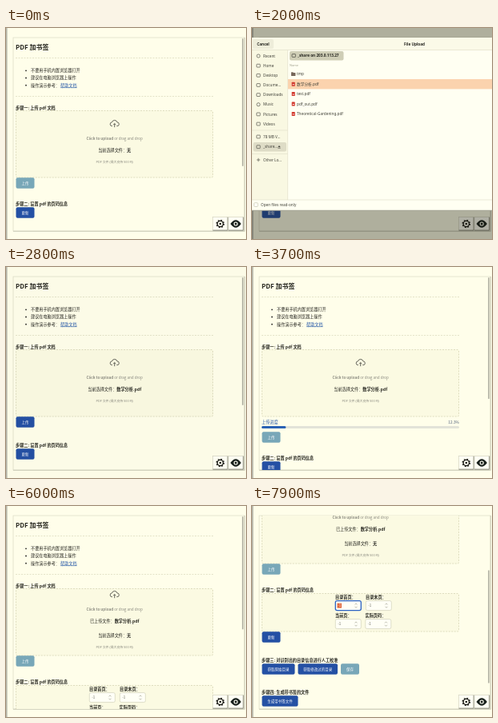
An HTML page that plays this animation: 300 px wide and 264 px high, repeating every 8000 ms.

```html
<!DOCTYPE html>
<html lang="zh">
<head>
<meta charset="utf-8">
<style>
html, body { margin: 0; width: 100%; height: 100%; overflow: hidden; background: #fffeea; }
svg { display: block; width: 100vw; height: 100vh; }
text { font-family: "Noto Sans CJK SC", "Noto Sans CJK", "Noto Sans", sans-serif; white-space: pre; }
.ui text { font-family: "Noto Sans", "Open Sans", "Noto Sans CJK SC", sans-serif; }
</style>
</head>
<body>
<svg id="stage" viewBox="0 0 300 264"></svg>
<script>
const LOOP = 8000;
const PAGE = '#fffeea', INK = '#25251f', GREY = '#8b8b80', BLUE = '#2450a4', PALE = '#78a7b8';
const TOP = 12, VIEW = 242;
const stage = document.getElementById('stage');

const clamp = v => Math.max(0, Math.min(1, v));
const ramp = (t, from, to) => clamp((t - from) / (to - from));
const easeOut = p => 1 - (1 - p) ** 2;

const rect = (x, y, w, h, fill, more = '') =>
  `<rect x="${x}" y="${y}" width="${w}" height="${h}" fill="${fill}" ${more}/>`;
const path = (d, stroke, width = 0.7, more = '') =>
  `<path d="${d}" fill="none" stroke="${stroke}" stroke-width="${width}" ${more}/>`;
// y is the middle of the line
const text = (x, y, s, size = 5.15, fill = INK, more = '') =>
  `<text x="${x}" y="${y + size * 0.36}" font-size="${size}" fill="${fill}" ${more}>${s}</text>`;
const BOLD = 'font-weight="700"', MID = 'text-anchor="middle"';
const bold = s => `<tspan ${BOLD}>${s}</tspan>`;
const heading = (y, s) => text(12, y, s, 5.15, INK, BOLD);
const button = (x, y, w, s, on = true) =>
  rect(x, y - 6.8, w, 13.6, on ? BLUE : PALE, 'rx="2"') +
  text(x + w / 2, y, s, 4.5, '#fff', MID);
const dashed = (y, h) =>
  rect(12.5, y, 246, h, '#fbfae2', 'rx="1.5" stroke="#d6d5b4" stroke-width=".8" stroke-dasharray="2 1.5"');
const rule = y => path(`M12 ${y}H259`, '#d9d8ba', 0.7, 'stroke-dasharray="2 1.5"');

function scrollAt(t) {
  const gesture = [25, 62, 86, 100, 100, 109, 115];
  const i = Math.floor((t - 6500) / 100);
  return i < 0 ? 0 : gesture[Math.min(i, gesture.length - 1)];
}

function progressAt(t) {
  const p = (Math.floor(t / 100) * 100 - 3500) / 500;
  return p <= 0.4 ? clamp(p) * 30.75 : 12.3 + clamp((p - 0.4) / 0.6) * 87.7;
}

function cloud(y) {
  return path(`M133 ${y + 2.7}h-.3a2.4 2.4 0 0 1-.2-4.8a3.3 3.3 0 0 1 6.4 0a2.4 2.4 0 0 1 0 4.8h-.6` +
    `M135.7 ${y + 4.2}v-4.6m-1.6 1.6l1.6-1.6l1.6 1.6`, '#55554d', 0.9);
}

function dropZone(t) {
  const done = t >= 4700, up = done ? 9 : 0;
  const chosen = t >= 2300 && !done ? '数学分析.pdf' : '无';
  return dashed(103.5, 83.5) + cloud(120 - up) +
    text(135.7, 138 - up, bold('Click to upload') + ' or drag and drop', 4.6, GREY, MID) +
    (done ? text(135.7, 144, '已上传文件：' + bold('数学分析.pdf'), 5.15, INK, MID) : '') +
    text(135.7, done ? 162 : 153, '当前选择文件：' + bold(chosen), 5.15, INK, MID) +
    text(135.7, done ? 177 : 168, 'PDF 文件 (最大支持 500 M)', 3.9, GREY, MID);
}

function progressBar(t) {
  const pct = progressAt(t);
  return text(12, 194, '上传进度', 5.15, '#2b5ca8') +
    text(259, 194, pct.toFixed(1) + '%', 4.8, '#52627c', 'text-anchor="end"') +
    rect(12, 199, 247, 3, '#e2e3d8', 'rx="1.5"') +
    rect(12, 199, 247 * pct / 100, 3, '#2b62b4', 'rx="1.5"');
}

function field(x, y, label, focus) {
  const edge = focus ? 'stroke="#2b62c4" stroke-width="1.3"' : 'stroke="#c9c9b2" stroke-width=".6"';
  return text(x, y, label, 5.15, INK, BOLD) +
    rect(x + .3, y + 4.6, 32, 12, '#fffff6', `rx="2" ${edge}`) +
    (focus ? rect(x + 2.5, y + 7.6, 5.5, 6, '#e0663a') : '') +
    text(x + 3.2, y + 10.6, '-1', 4.4, focus ? '#fff' : '#66665c') +
    path(`M${x + 24.5} ${y + 9.4}l1.5-1.5l1.5 1.5m0 2.4l-1.5 1.5l-1.5-1.5`, '#8f8f80', 0.6);
}

function content(t) {
  const uploading = t >= 3500 && t < 4300, form = t >= 4700;
  const shift = uploading ? 19 : t >= 2300 && t < 3500 ? 3 : 0;
  const uploadOn = t >= 2300 && t < 3200;
  const low = shift + (form ? 48 : 0);
  const list = ['不要用手机内置浏览器打开', '建议在电脑浏览器上操作', '操作演示参考：'];
  return text(12, 24, 'PDF 加书签', 8, INK, BOLD) + rule(37.5) + rule(85.5) +
    list.map((s, i) => {
      const y = 53.3 + i * 9.2;
      return `<circle cx="25" cy="${y}" r=".9" fill="${INK}"/>` + text(31, y, s);
    }).join('') +
    text(68, 71.7, '帮助文档', 5.15, '#2b5ca8', 'text-decoration="underline"') +
    heading(100, '步骤一: 上传 pdf 文档') + dropZone(t) +
    (uploading ? progressBar(t) : '') +
    button(12.5, uploading ? 213 : 194, 23, '上传', uploadOn) +
    heading(220 + shift, '步骤二: 设置 pdf 的页码信息') +
    (form ? dashed(224.5, 47.5) +
      field(104, 229, '目录首页：', t >= 7300) + field(142, 229, '目录末页：') +
      field(104, 252, '当前页：') + field(141.5, 252, '实际页码：') : '') +
    button(12.5, 231 + low, 23, '更新') +
    heading(260 + low, '步骤三: 对识别出的目录信息进行人工校准') +
    button(12.5, 271 + low, 41, '获取原始目录') +
    button(57.5, 271 + low, 49.5, '获取修改过的目录') +
    button(111, 271 + low, 23, '保存', false) +
    heading(300 + low, '步骤四: 生成带书签的文件') +
    button(12.5, 311 + low, 45, '生成带书签文件');
}

function scrollbar(t, scroll) {
  const full = 366 + (t >= 3500 && t < 4300 ? 19 : t >= 4700 ? 48 : 0);
  return rect(295, TOP + 1 + scroll * VIEW / full, 1.8, VIEW * VIEW / full, '#b9b9aa', 'rx=".9"');
}

function tools() {
  const box = x => rect(x, 236.5, 18.5, 16.5, '#fffff4', 'stroke="#d5d5c2" stroke-width=".7"') +
    path(`M${x} 253.2h18.7v-16.5`, '#77776c', 0.8);
  const teeth = `<circle cx="267.8" cy="245" r="4.3" fill="none" stroke="#1c1c18" stroke-width="2" stroke-dasharray="1.7 1.68"/>`;
  return box(258.5) + box(278) + teeth +
    `<circle cx="267.8" cy="245" r="3.6" fill="#fffff4" stroke="#1c1c18" stroke-width="1.3"/>
     <circle cx="267.8" cy="245" r="1.3" fill="#1c1c18"/>
     <path d="M280.5 245q6.7-9.4 13.4 0q-6.7 9.4-13.4 0" fill="#18201c"/>
     <circle cx="287.2" cy="245" r="2.6" fill="#fffff4"/><circle cx="287.2" cy="245" r="1.5" fill="#18201c"/>`;
}

function page(t) {
  const scroll = scrollAt(t);
  return rect(0, 0, 300, 264, PAGE) + rect(0, 0, 1.6, 264, '#b5b5aa') +
    rect(9, TOP, 289, VIEW, PAGE, 'stroke="#dedec8" stroke-width=".8"') +
    path('M9 254.3H298.3V12', '#c4c4b2', 0.8) +
    `<g clip-path="url(#view)"><g transform="translate(0 ${-scroll})">${content(t)}</g></g>` +
    scrollbar(t, scroll) + tools();
}

const sideIcon = (y, round) => round
  ? `<circle cx="8" cy="${y}" r="2.1" fill="none" stroke="#55554d" stroke-width=".7"/>`
  : rect(5.8, y - 1.9, 4.4, 3.8, 'none', 'rx=".5" stroke="#55554d" stroke-width=".7"');

function dialog(t) {
  const places = ['Recent', 'Home', 'Desktop', 'Docume…', 'Downloads', 'Music', 'Pictures', 'Videos'];
  const files = ['tmp', '数学分析.pdf', 'test.pdf', 'pdf_out.pdf', 'Theoretical-Gardening.pdf'];
  const picked = t < 1600 ? 0 : 1;
  const small = (x, y, s, fill = '#44443c', more = '') => text(x, y, s, 4.7, fill, more);
  return rect(0, 12, 300, 216.5, '#fffff2') + rect(0, 12, 300, 15.5, '#fbfae8') +
    rect(1, 14, 26, 12, '#eeedda', 'rx="2"') +
    small(14, 20, 'Cancel', INK, MID + ' font-weight="600"') +
    small(203, 20, 'File Upload', INK, MID + ' ' + BOLD) +
    rect(0, 27.5, 44.5, 187.5, '#f9f8e2') +
    places.map((s, i) => sideIcon(35 + i * 12.15, i % 5 === 0) + small(14, 35 + i * 12.15, s)).join('') +
    path('M0 128H44.5', '#dddcc6', 0.6) +
    sideIcon(136) + small(14, 136, '78 MB V…') +
    rect(1.5, 143, 41.5, 11.5, '#dedcc6', 'rx="2"') + sideIcon(148.7) + small(14, 148.7, '_share…') +
    `<path d="M32.4 149l1.6-2l1.6 2zM32.4 149.7h3.2v.8h-3.2z" fill="#44443c"/>` +
    path('M0 157.5H44.5', '#dddcc6', 0.6) +
    path('M5.8 165h4.4M8 162.8v4.4', '#55554d') + small(14, 165, 'Other Lo…') +
    path('M44.6 27.5V215M0 215H300M0 27.5H300', '#dddcc6', 0.6) +
    rect(47, 29, 67.5, 11.5, '#cfceb6', 'rx="2"') +
    rect(50, 32.6, 4.4, 3.8, 'none', 'rx=".5" stroke="#44443c" stroke-width=".7"') +
    small(57, 34.7, '_share on 203.0.113.27', INK, 'font-weight="600"') +
    text(47, 46.3, 'Name', 3.9, '#a5a594') +
    rect(45, 51.6 + picked * 12.4, 255, 12.4, '#fbd3ae') +
    files.map((s, i) => {
      const y = 57.8 + i * 12.4;
      const icon = i ? rect(49.7, y - 2.5, 4, 5, '#d2372c', 'rx=".5"') + rect(50.8, y, 1.8, 1, '#fff')
        : rect(49, y - 1.8, 5.4, 4, '#77675a', 'rx=".5"') + rect(49, y - 2.5, 2.6, 1.5, '#77675a');
      return icon + small(56, y, s);
    }).join('') +
    rect(2.5, 218.7, 4.8, 4.8, '#fffff6', 'rx="1" stroke="#bdbda9" stroke-width=".6"') +
    small(11, 221, 'Open files read-only') + path('M0 228.3H300', '#8e8e80', 0.8);
}

function draw(t) {
  const dim = 0.34 * (easeOut(ramp(t, 400, 800)) - easeOut(ramp(t, 2200, 2950)));
  const shown = t < 2200 ? ramp(t, 400, 700) : 1 - ramp(t, 2200, 2400);
  stage.innerHTML = `<defs><clipPath id="view">${rect(9, TOP, 289, VIEW, '#000')}</clipPath></defs>` +
    page(t) + rect(0, 0, 300, 264, '#15150a', `opacity="${dim}"`) +
    (shown > 0 ? `<g class="ui" opacity="${shown}">${dialog(t)}</g>` : '');
}

const start = performance.now();
function tick() {
  draw((performance.now() - start) % LOOP);
  requestAnimationFrame(tick);
}
tick();
</script>
</body>
</html>
```
